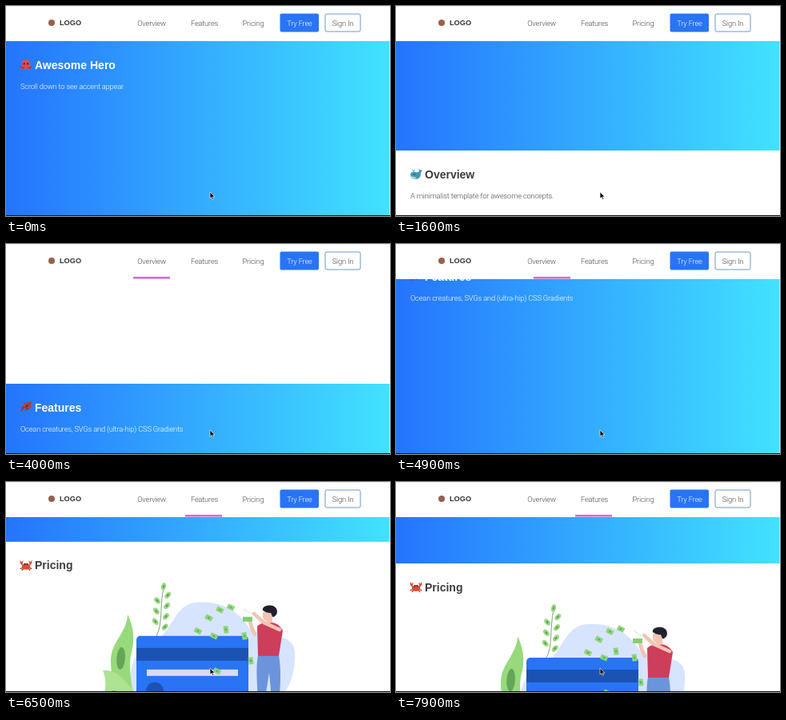
Recreate the animation shown at these times as an HTML page. Size 480 by 263 pixels, loop 8 s.

```html
<!DOCTYPE html>
<html lang="en">
<head>
<meta charset="utf-8">
<title>Scroll accent</title>
<style>
  html, body { margin: 0; width: 100%; height: 100%; overflow: hidden; background: #fff; }
  svg { display: block; width: 100vw; height: 100vh; }
  text { font: 300 9.3px Roboto, "Liberation Sans", sans-serif; letter-spacing: -.18px; fill: #4a4a4a; }
  .title { font: 700 14px "Liberation Sans", Arial, sans-serif; letter-spacing: 0; fill: #3c3c3c; }
  .brand { font: 700 9.2px "Liberation Sans", Arial, sans-serif; letter-spacing: 0; fill: #333; }
  .nav { text-anchor: middle; }
  .light text, .nav.light { fill: #fff; }
  .skin { fill: #f1c4b3; }
  .limb { fill: none; stroke: #f1c4b3; stroke-width: 4.6; stroke-linecap: round; stroke-linejoin: round; }
</style>
</head>
<body>
<svg viewBox="0 0 480 263" preserveAspectRatio="none">
  <defs>
    <linearGradient id="sea">
      <stop offset="0" stop-color="#2574fd"/>
      <stop offset="1" stop-color="#42e2ff"/>
    </linearGradient>
    <g id="bill">
      <rect x="-4.5" y="-3" width="9" height="6" fill="#8fd47c"/>
      <ellipse rx="1.6" ry="1.3" fill="#62b65a"/>
    </g>
    <g id="sprig">
      <ellipse rx="4.8" ry="3" fill="#9cd984"/>
      <ellipse rx="2" ry="1.1" fill="#5c9e53"/>
    </g>
  </defs>

  <g id="page">
    <g class="light" transform="translate(0 44)">
      <rect width="479.5" height="262" fill="url(#sea)"/>
      <g transform="translate(25 29.5) scale(1.1)">
        <path d="M-4.5 0C-6-8 6-8 4.5 0L6.5 4Q6 6 4 4L3 6 1 4-1 6-3 4Q-6 7-6.5 4Z" fill="#d84e50"/>
        <path d="M-6 2Q-5 5-2 3M6 2Q5 5 2 3" fill="none" stroke="#8e2b43"/>
        <circle cx="-2" cy="-1" r="1" fill="#431d2b"/><circle cx="2" cy="-1" r="1" fill="#431d2b"/>
      </g>
      <text class="title" x="36" y="34.5">Awesome Hero</text>
      <text x="18" y="59.5">Scroll down to see accent appear</text>
    </g>

    <g transform="translate(0 306)">
      <g transform="translate(25 30)">
        <path d="M-7 0Q-6-4-1-3 3-2 4-4L3-7 5.5-5.5 7.5-6Q7-3 6-2 6 6-1 6-7 6-7 0Z" fill="#4298b4"/>
        <path d="M-7 1Q-3 4 0 3L-1 6Q-6 6-7 1Z" fill="#b9dce4"/>
        <path d="M-3-3Q-3-6-5-6M-3-4Q-2-7-1-6" fill="none" stroke="#5cb5d0"/>
        <circle cx="-2" cy="0" r=".8" fill="#163a4c"/>
      </g>
      <text class="title" x="36" y="34.5">Overview</text>
      <text x="18" y="59.5">A minimalist template for awesome concepts.</text>
    </g>

    <g class="light" transform="translate(0 568)">
      <rect width="479.5" height="262" fill="url(#sea)"/>
      <g transform="translate(25 29)">
        <path d="M7-7L6 1 2 4-1 2-5 6-7 5-4 1-7 2-6 0-3-2-2-5Z" fill="#a9443f"/>
        <path d="M5-5L-1 1M-2 0L-6 4M2 1L0 5" fill="none" stroke="#65343f"/>
        <circle cx="1" cy="-1" r="1" fill="#2d1b2c"/>
      </g>
      <text class="title" x="36" y="34.5">Features</text>
      <text x="18" y="59.5">Ocean creatures, SVGs and (ultra-hip) CSS Gradients</text>
    </g>

    <g transform="translate(0 830)">
      <g transform="translate(25 29.5) scale(1.05)">
        <path d="M-4 0L-6-3M4 0L6-3M-4 3L-7 4M4 3L7 4M-3 4L-5 6M3 4L5 6" fill="none" stroke="#b53a2b" stroke-width="1.3"/>
        <ellipse cy="1.5" rx="5" ry="3.7" fill="#d94b36"/>
        <path d="M-4-2L-7-2-7-6-5-4-3-6ZM4-2L7-2 7-6 5-4 3-6Z" fill="#d94b36"/>
        <circle cx="-1.5" cy="-1.5" r="1" fill="#3c1d1b"/><circle cx="1.5" cy="-1.5" r="1" fill="#3c1d1b"/>
      </g>
      <text class="title" x="36" y="34.5">Pricing</text>

      <path d="M195 118C209 104 214 78 238 76 266 74 289 84 304 108 318 122 360 110 361 139 362 158 356 190 338 195 310 200 288 200 276 213 262 230 236 234 213 222 195 212 175 213 163 206 152 190 152 160 164 140Z" fill="#d7e4fd"/>

      <path d="M152 91C162 112 160 128 156 142 153 160 158 190 163 207H150C138 190 131 170 131 150 131 125 151 115 152 91Z" fill="#97d97b"/>
      <ellipse cx="143.6" cy="146" rx="5.3" ry="14" fill="#64a557" transform="rotate(4 143.6 146)"/>
      <path d="M121 161C142 159 152 180 163 190V207C150 209 134 206 125 198 119 190 129 182 121 161Z" fill="#ade393"/>
      <ellipse cx="137" cy="192" rx="7" ry="4.5" fill="#64a557" transform="rotate(40 137 192)"/>

      <path d="M188 118C196 104 192 82 197 57" fill="none" stroke="#5f8f57" stroke-width=".8"/>
      <g id="leaves"></g>

      <rect x="163" y="118" width="140" height="87" rx="5" fill="#2874f5"/>
      <rect x="163" y="133" width="140" height="16" fill="#1b53b3"/>
      <rect x="176" y="160" width="114" height="8" fill="#d9dbee"/>
      <circle cx="186" cy="187" r="11" fill="#1b53b3"/>

      <path d="M315 142H341C345 165 342 188 341 208H333L329 164 322 208H314C316 186 311 165 315 142Z" fill="#6b94dc"/>
      <path d="M314 207H322L323 214H309Q309 210 314 207ZM333 207H341L347 213 337 214Z" fill="#a3a0ba"/>
      <path d="M314 106Q319 101 328 101 340 100 346 111L341 143H315Z" fill="#cd3e5b"/>
      <path class="limb" d="M305 100L307 107 311 116"/>
      <path class="limb" d="M310 90L322 101 342 110"/>
      <path class="skin" d="M321 88H333V101Q327 104 325 99 320 99 321 88Z"/>
      <path d="M321 86C319 79 335 77 338 84 341 90 336 95 333 94L331 89Q326 90 321 86Z" fill="#20202e"/>
      <path d="M297 84L307 91" stroke="#b9c5d5" stroke-width=".6"/>
      <rect x="296" y="94" width="12" height="6" fill="#84cd70"/>
      <g id="bills"></g>
    </g>
  </g>

  <rect width="480" height="44" fill="#fff"/>
  <path d="M0 .25H480" stroke="#d4d4d4" stroke-width=".5"/>
  <circle cx="57" cy="21" r="4" fill="#96604d"/>
  <text class="brand" x="67" y="24.3">LOGO</text>
  <text class="nav" x="182" y="24.5">Overview</text>
  <text class="nav" x="248" y="24.5">Features</text>
  <text class="nav" x="309" y="24.5">Pricing</text>
  <rect x="342.5" y="9.5" width="48.5" height="23" rx="2" fill="#2874f4"/>
  <text class="nav light" x="367" y="25">Try Free</text>
  <rect x="399" y="10" width="44" height="22" rx="2" fill="#fff" stroke="#5f8ebd" stroke-width=".9"/>
  <text class="nav" x="421" y="25">Sign In</text>
  <rect id="accent" y="41" width="46" height="2.6" fill="#d06dd2"/>
  <rect y="262" width="480" height="1" fill="#101318"/>
  <path d="M255 233V241L257 239.5 258.3 242.3 259.6 241.7 258.4 239H261Z" fill="#111" stroke="#fff" stroke-width=".6"/>
</svg>

<script>
  const LOOP = 8000, STEP = 100, SLIDE = 350, SECTION = 262;
  const linkLeft = [159, 224, 286];
  const page = document.getElementById("page");
  const accent = document.getElementById("accent");

  // [time, scroll offset]
  const scrollKeys = [
    [0, 0], [1600, 125], [3200, 290], [3400, 290], [4000, 393],
    [5800, 720.5], [6800, 770], [7050, 830], [7150, 830], [7900, 728]
  ];

  const clamp = v => Math.max(0, Math.min(1, v));
  const smooth = p => p * p * (3 - 2 * p);
  const use = (shape, x, y, angle) =>
    `<use href="#${shape}" transform="translate(${x} ${y}) rotate(${angle})"/>`;

  function scrollAt(t) {
    const i = scrollKeys.findIndex(k => k[0] > t);
    if (i < 0) return scrollKeys[scrollKeys.length - 1][1];
    const [t0, a] = scrollKeys[i - 1], [t1, b] = scrollKeys[i];
    return a + (b - a) * (t - t0) / (t1 - t0);
  }

  // The accent moves whenever another section reaches the navigation bar.
  function findMoves() {
    const moves = [];
    let current = 0;
    for (let t = 0; t < LOOP; t += STEP) {
      const section = Math.floor(scrollAt(t) / SECTION);
      if (section !== current) moves.push([t, linkLeft[section - 1]]);
      current = section;
    }
    return moves;
  }
  const moves = findMoves();

  function accentAt(t) {
    return moves.reduce((x, [start, left]) =>
      x + (left - x) * smooth(clamp((t - start) / SLIDE)), linkLeft[0]);
  }

  function growLeaves() {
    let out = use("sprig", 197, 56, -75);
    for (let i = 0; i < 7; i++) {
      const side = i % 2 ? -1 : 1, y = 67 + 6.6 * i;
      out += use("sprig", 196 - i * .6 + side * 6.3, y, -side * 48);
    }
    return out;
  }

  function tossBills() {
    let out = "";
    for (let i = 0; i < 4; i++) out += use("bill", 281 - 13.7 * i, 82 + 3.3 * i * i, 27);
    for (const [x, y] of [[260, 118], [275, 110], [298, 118], [306, 149], [264, 162]])
      out += use("bill", x, y, x > 270 ? 82 : 24);
    for (let i = 0; i < 3; i++)
      for (let j = -1; j < 2; j++)
        out += use("bill", 232 + 12 * i + 2.5 * j, 211 + 9 * (i % 2) + i + Math.abs(j), 35 * j);
    return out;
  }

  function draw() {
    const t = Math.floor(performance.now() % LOOP / STEP) * STEP;
    page.setAttribute("transform", `translate(0 ${-scrollAt(t)})`);
    accent.setAttribute("x", accentAt(t));
    accent.setAttribute("opacity", clamp((t - moves[0][0]) / SLIDE));
    requestAnimationFrame(draw);
  }

  document.getElementById("leaves").innerHTML = growLeaves();
  document.getElementById("bills").innerHTML = tossBills();
  draw();
</script>
</body>
</html>
```
